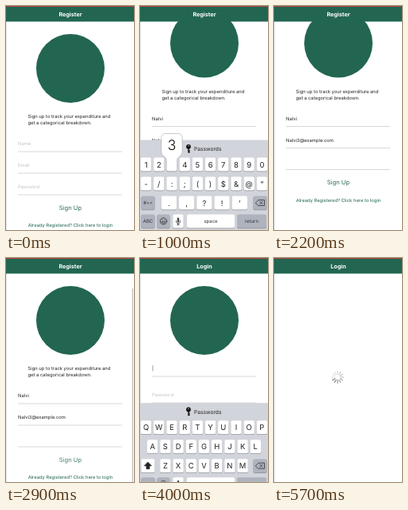
Write an HTML page that moves like this. It is 161 px wide and 280 px high and loops after 5.8 s.

```html
<!DOCTYPE html>
<html lang="en">
<head>
<meta charset="utf-8">
<title>Register and login</title>
<style>
  html, body { margin: 0; width: 100%; height: 100%; overflow: hidden; background: #fff; }
  svg { display: block; width: 100vw; height: 100vh; }
  text {
    font-family: Inter, "Liberation Sans", sans-serif; font-size: 5.85px; fill: #222;
    white-space: pre; text-rendering: geometricPrecision;
  }
  .mid { text-anchor: middle; }
  .title { font-size: 7.2px; font-weight: 700; fill: #fff; }
  .hint { fill: #c4c4c4; }
  .button { font-size: 7.6px; fill: #2a6b58; }
  .link { fill: #1f6552; }
  .rule { stroke: #cfcfcf; stroke-width: .8; }
  .key { font-size: 9.5px; fill: #222; }
  .small { font-size: 6px; fill: #333; }
  .big { font-size: 17.5px; font-weight: 300; fill: #111; }
  .icon { fill: none; stroke: #333; stroke-width: .8; stroke-linejoin: round; stroke-linecap: round; }
</style>
</head>
<body>
<svg id="stage" viewBox="0 0 161 280" preserveAspectRatio="none"></svg>
<script>
const LOOP = 5800;
const GREEN = '#226652';
const NAME = 'Nalvi';
const EMAIL = 'Nalvi3@example.com';
const stage = document.getElementById('stage');

function el(parent, tag, attrs = {}, content = '') {
  const node = document.createElementNS('http://www.w3.org/2000/svg', tag);
  for (const k in attrs) node.setAttribute(k, attrs[k]);
  node.textContent = content;
  parent.append(node);
  return node;
}
const label = (parent, x, y, content, cls = '') => el(parent, 'text', { x, y, class: cls }, content);
const box = (parent, x, y, width, height, fill, rx = 0) =>
  el(parent, 'rect', { x, y, width, height, fill, rx });
const show = (node, on) => node.setAttribute('display', on ? 'inline' : 'none');
const move = (node, x, y) => node.setAttribute('transform', `translate(${x} ${y})`);
const clamp = (v, lo = 0, hi = 1) => Math.min(hi, Math.max(lo, v));
const ramp = (t, from, to) => clamp((t - from) / (to - from));
const easeOut = u => 1 - (1 - u) ** 3;

// Forms
function makeField(parent, y, hint) {
  const text = label(parent, 15, y + 2, hint, 'hint');
  el(parent, 'path', { class: 'rule', d: `M15 ${y + 10}H146` });
  return (value, focused) => {
    const empty = value === '';
    text.setAttribute('class', empty && !focused ? 'hint' : '');
    text.textContent = empty && !focused ? hint : value + (focused ? '|' : '');
  };
}

function makePage(fields, button, buttonY, link, linkY) {
  const root = el(stage, 'g');
  box(root, 0, 0, 161, 340, '#fff');
  const logo = el(root, 'circle', { cx: 81, cy: 78, r: 43, fill: GREEN });
  return {
    root, logo,
    fields: fields.map(([hint, y]) => makeField(root, y, hint)),
    button: label(root, 81, buttonY, button, 'mid button'),
    link: label(root, 81, linkY, link, 'mid link')
  };
}

const register = makePage([['Name', 172], ['Email', 199], ['Password', 226]],
  'Sign Up', 254.5, 'Already Registered? Click here to login', 276);
label(register.root, 27.5, 140, 'Sign up to track your expenditure and');
label(register.root, 27.5, 148, 'get a categorical breakdown.');

const login = makePage([['Email', 138], ['Password', 171]],
  'Login', 199.5, 'Don\u2019t have an account? Click to register', 221);

const scrollBar = box(stage, 158.6, 38, 1.4, 242, '#c2c2c2', .7);

// Loading screen
const loader = el(stage, 'g');
box(loader, 0, 0, 161, 280, '#fff');
const spokes = Array.from({ length: 12 }, (_, i) => el(loader, 'path', {
  d: 'M0-3.7V-7.4', 'stroke-width': 1.2, 'stroke-linecap': 'round',
  transform: `translate(80 149) rotate(${i * 30})`
}));

box(stage, 0, 19, .7, 261, '#d4d4d4');

// Header
box(stage, 0, 0, 161, 19.5, GREEN);
box(stage, 0, 0, 161, 1, '#b3453f');
const registerTitle = label(stage, 81, 12.7, 'Register', 'mid title');
const loginTitle = label(stage, 81, 12.7, 'Login', 'mid title');

// Keyboard
const board = el(stage, 'g');
box(board, 0, 167.5, 161, 113, '#d1d4da');
label(board, 68, 181, 'Passwords').style.fontSize = '6.7px';
el(board, 'circle', { cx: 61, cy: 175.8, r: 2.9, fill: '#111' });
el(board, 'path', { d: 'M61 178V183.5M61.5 180.7H62.8M61.5 182.7H62.8', stroke: '#111', 'stroke-width': 1.4 });
el(board, 'circle', { cx: 61, cy: 174.8, r: .7, fill: '#d1d4da' });

function cap(parent, x, y, w, fill = '#fff') {
  box(parent, x - w / 2, y - 7.8, w, 17, '#8b8e94', 2);
  box(parent, x - w / 2, y - 8.5, w, 17, fill, 2);
}
const GREY = '#aeb3bd';
const ROW_Y = [198, 222, 246, 269];

function makeLayout(rows, starts, steps, widths) {
  const root = el(board, 'g');
  const spots = {};
  rows.forEach((row, r) => [...row].forEach((ch, i) => {
    const x = starts[r] + i * steps[r], y = ROW_Y[r];
    cap(root, x, y, widths[r]);
    label(root, x, y + 3.5, ch, 'mid key');
    spots[ch] = [x, y];
  }));
  return { root, spots };
}

const letters = ['qwertyuiop', 'asdfghjkl', 'zxcvbnm'];
const letterGrid = [[7.6, 15.7, 31.9], [16.2, 16.2, 16.2], [13.4, 13.4, 13.4]];
const layouts = {
  lower: makeLayout(letters, ...letterGrid),
  upper: makeLayout(letters.map(r => r.toUpperCase()), ...letterGrid),
  digits: makeLayout(['1234567890', '-/:;()$&@\u201d', '.,?!\u2019'],
    [7.6, 7.6, 36.5], [16.2, 16.2, 22.2], [13.4, 13.4, 19.4])
};

for (const name in layouts) {
  const root = layouts[name].root, isDigits = name === 'digits';
  cap(root, 10, 246, 17, name === 'upper' ? '#fff' : GREY);
  if (isDigits) label(root, 10, 248, '#+=', 'mid small');
  else el(root, 'path', { class: 'icon', d: 'M10 241.5L14.5 246H12V250H8V246H5.5Z',
    style: name === 'upper' ? 'fill:#222' : '' });
  cap(root, 10, 269, 17, GREY);
  label(root, 10, 271.2, isDigits ? 'ABC' : '123', 'mid small');
}

cap(board, 151, 246, 17, GREY);
el(board, 'path', { class: 'icon', d: 'M145.5 246L149 242.5H156.5V249.5H149ZM150.8 244.4L154 247.6M154 244.4L150.8 247.6' });
cap(board, 29.5, 269, 16, GREY);
el(board, 'circle', { class: 'icon', cx: 29.5, cy: 269, r: 4.2 });
el(board, 'path', { class: 'icon', d: 'M27 270Q29.5 274 32 270ZM28 267V267.6M31 267V267.6' });
cap(board, 48, 269, 13.4);
el(board, 'path', { class: 'icon', d: 'M45.5 268.5V269.5Q45.7 271.8 48 271.8T50.5 269.5V268.5M48 272V273.6M46.8 273.6H49.2' });
box(board, 46.8, 264.4, 2.4, 6, '#444', 1.2);
cap(board, 89, 269, 60);
label(board, 89, 271.2, 'space', 'mid small');
cap(board, 140.5, 269, 37, GREY);
label(board, 140.5, 271.2, 'return', 'mid small');

const bubble = el(board, 'g');
el(bubble, 'path', {
  d: 'M-6.7 6.5V-5C-6.7-10-13.2-10-13.2-16V-33q0-5.5 5.5-5.5h15.4q5.5 0 5.5 5.5V-16C13.2-10 6.7-10 6.7-5V6.5q0 2-2 2h-9.4q-2 0-2-2z',
  fill: '#fff', stroke: '#a4a7ae', 'stroke-width': .6
});
const bubbleText = label(bubble, 0, -17.8, '', 'mid big');

// Typing: each stroke has a time, a character and a field
const strokes = [];
const type = (field, text, start, step) =>
  [...text].forEach((ch, i) => strokes.push({ at: start + i * step, ch, field }));
type('name', NAME, 300, 70);
type('email', EMAIL.slice(0, 5), 700, 55);
type('email', EMAIL.slice(5, 7), 980, 80);
type('email', EMAIL.slice(7), 1130, 54);
type('login', EMAIL, 4130, 33);

const typed = (field, t) =>
  strokes.filter(s => s.field === field && s.at <= t).map(s => s.ch).join('');

function drawKeyboard(t, lift) {
  show(board, lift > 0);
  move(board, 0, (1 - lift) * 113);
  const field = t < 650 ? 'name' : t < 3000 ? 'email' : 'login';
  const last = strokes.filter(s => s.field === field && s.at <= t).pop();
  const current = last ? Object.keys(layouts).find(n => last.ch in layouts[n].spots) : 'upper';
  for (const n in layouts) show(layouts[n].root, n === current);
  const pressed = last && t - last.at < 80;
  show(bubble, pressed);
  if (pressed) {
    const [x, y] = layouts[current].spots[last.ch];
    move(bubble, clamp(x, 14, 147), y);
    bubbleText.textContent = last.ch;
  }
}

function draw(t) {
  const span = (from, to, length) =>
    easeOut(ramp(t, from, from + 200)) - easeOut(ramp(t, to, to + length));
  const lift = span(100, 1800, 150) + span(3900, 4900, 150);
  const scroll = 31.5 * span(100, 2550, 250);
  const slide = Math.sin(ramp(t, 3325, 3825) * Math.PI / 2);
  const fresh = t >= 3000;

  move(register.root, -.3 * 161 * slide, -scroll);
  show(register.logo, !fresh);
  register.fields[0](fresh ? '' : typed('name', t), t >= 100 && t < 650);
  register.fields[1](fresh ? '' : typed('email', t), t >= 650 && t < 1800);
  // Secure entry stays blank
  register.fields[2](!fresh && t >= 2000 ? ' ' : '', t >= 1800 && t < 2000);
  register.button.setAttribute('opacity', t >= 2800 && t < 3000 ? .85 : 1);
  show(scrollBar, t >= 2550 && t < 3000);

  show(login.root, slide > 0);
  move(login.root, 161 * (1 - slide), 0);
  login.fields[0](typed('login', t), t >= 3900 && t < 4900);
  login.fields[1](t >= 5100 ? ' ' : '', t >= 4900 && t < 5100);
  login.button.setAttribute('opacity', t >= 5350 ? .85 : 1);

  registerTitle.setAttribute('opacity', clamp(1 - slide * 1.2));
  loginTitle.setAttribute('opacity', ramp(slide, .4, 1));

  show(loader, (t >= 3000 && t < 3200) || t >= 5500);
  const head = Math.floor(t / 83.333);
  spokes.forEach((s, i) => {
    const age = (((head - i) % 12) + 12) % 12;
    const grey = Math.min(222, 125 + age * 11);
    s.setAttribute('stroke', `rgb(${grey},${grey},${grey})`);
  });

  drawKeyboard(t, lift);
}

const begin = performance.now();
function tick() {
  draw((performance.now() - begin) % LOOP);
  requestAnimationFrame(tick);
}
tick();
</script>
</body>
</html>
```
